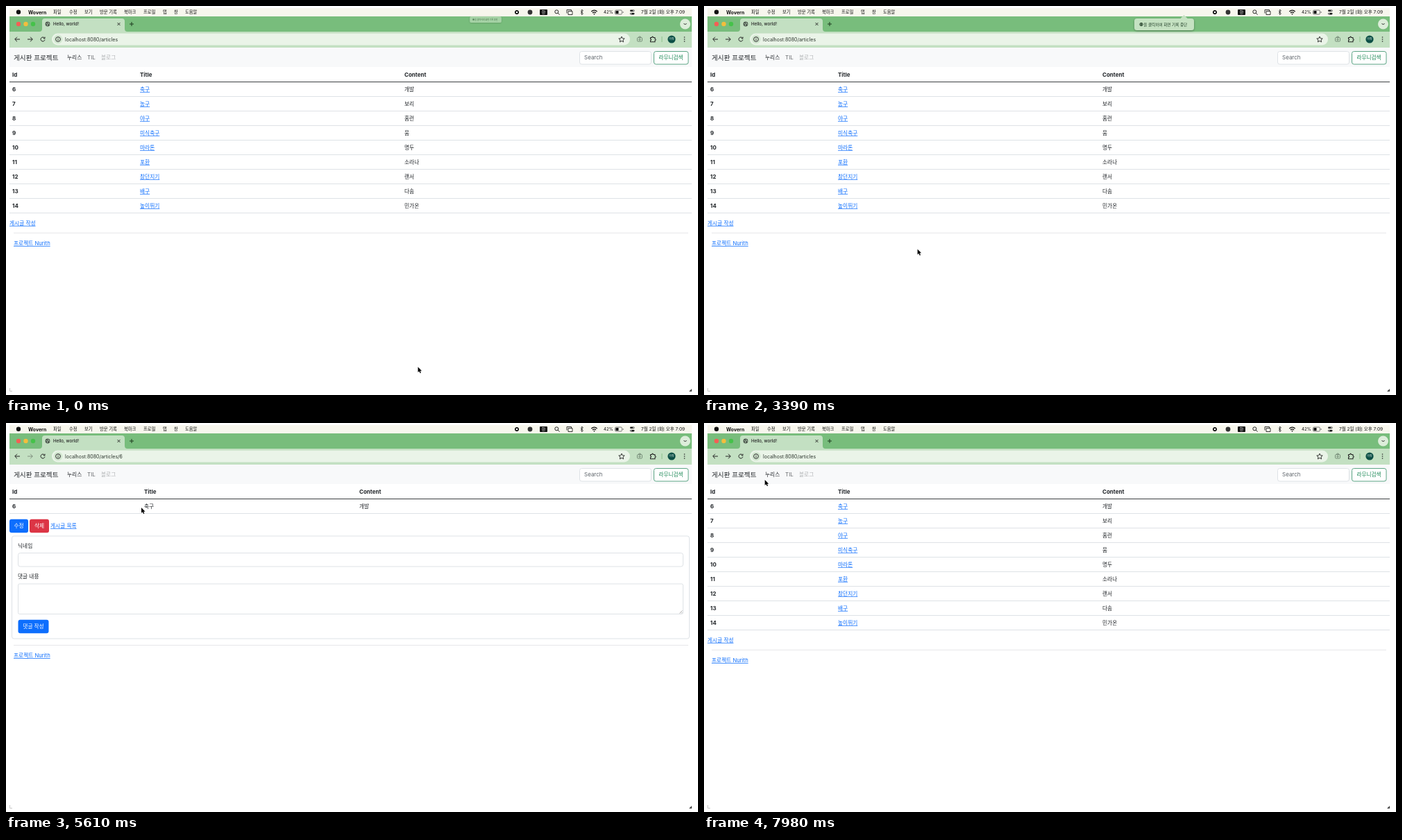
These frames come from a looping animation (997 px wide and 561 px high, 8000 ms). An HTML page:

```html
<!DOCTYPE html>
<html lang="ko">
<head>
<meta charset="utf-8">
<title>게시판 프로젝트</title>
<style>
html, body { margin: 0; height: 100%; overflow: hidden; background: #fff; }
svg { display: block; width: 100%; height: 100%; }
text { font-family: Inter, "Noto Sans CJK KR", sans-serif; white-space: pre; }
</style>
</head>
<body>
<svg id="stage" viewBox="0 0 997 561"></svg>
<script>
const LOOP = 8000, INK = '#212529', LINK = '#0d6efd', LINE = '#dee2e6';

// y is the visual middle of the line of text
const text = (x, y, s, size = 7.7, fill = INK, extra = '') =>
  `<text x="${x}" y="${y + size * 0.37}" font-size="${size}" fill="${fill}" ${extra}>${s}</text>`;
const bold = (x, y, s, size = 8) => text(x, y, s, size, INK, 'font-weight="700"');
const link = (x, y, s) => text(x, y, s, 7.7, LINK, 'text-decoration="underline"');
const rect = (x, y, w, h, fill, rx = 0, stroke = 'none') =>
  `<rect x="${x}" y="${y}" width="${w}" height="${h}" rx="${rx}" fill="${fill}" stroke="${stroke}"/>`;
const circle = (x, y, r, fill, stroke = 'none') =>
  `<circle cx="${x}" cy="${y}" r="${r}" fill="${fill}" stroke="${stroke}"/>`;
const path = (d, stroke = '#222', width = 1, fill = 'none') =>
  `<path d="${d}" stroke="${stroke}" stroke-width="${width}" fill="${fill}" stroke-linejoin="round"/>`;
const rule = (y, color = LINE, x1 = 5, x2 = 988) => path(`M${x1} ${y}H${x2}`, color);
const group = (id, body) => `<g id="${id}">${body}</g>`;

function menuBar() {
  const items = [[68, '파일'], [91, '수정'], [113, '보기'], [135, '방문 기록'], [170, '북마크'],
    [198, '프로필'], [226, '탭'], [242, '창'], [258, '도움말']];
  return rect(5, 3, 983, 12, '#f7f6ed') + circle(18, 8.8, 3.2, '#111') +
    text(32, 9, 'Wovern', 6.9, '#111', 'font-weight="700"') +
    items.map(([x, s]) => text(x, 9, s, 6.3, '#111', 'font-weight="500"')).join('') +
    circle(736, 9, 2.6, '#111', '#111') + circle(736, 9, 1.3, '#fff') +
    circle(755, 9, 3.4, '#333') +
    rect(769, 5, 11, 8, '#111', 1) + text(771.7, 9, '한', 6, '#fff') +
    circle(793.3, 8.3, 2.5, 'none', '#222') + path('M795.2 10.2L797.6 12.6') +
    path('M808 10.5V5.5H814.5V7M810 7.5H816V12.5H810Z', '#222', 0.9) +
    path('M827.7 7L831.5 10.8L829.6 12.8V5L831.5 7L827.7 10.8', '#222', 0.8) +
    path('M843.3 8Q847.5 4.2 851.7 8M845 10Q847.5 7.7 850 10', '#111', 1.3) + circle(847.5, 11.6, 0.9, '#111') +
    text(861, 9, '42%', 6.2, '#111') +
    rect(877.5, 6, 10, 6, 'none', 1.6, '#777') + rect(878.5, 7, 4, 4, '#111', 0.5) + path('M889.2 8V10', '#777') +
    rect(899, 5.5, 6.5, 2.6, '#222', 1.3) + rect(899, 9.8, 6.5, 2.6, '#222', 1.3) +
    circle(904, 6.8, 0.8, '#fff') + circle(900.5, 11.1, 0.8, '#fff') +
    text(915, 9, '7월 2일 (화) 오후 7:09', 6.5, '#111');
}

function browser() {
  const lights = ['#f45f55', '#f3be3c', '#45c24a'].map((c, i) => circle(18 + i * 10.5, 26, 3.2, c)).join('');
  return rect(5, 15, 983, 23, '#78bd7c') + rect(5, 37, 983, 23, '#c3e0c2') + lights +
    path('M48 37Q52 37 52 33V22Q52 18 56 18H167Q171 18 171 22V33Q171 37 175 37Z', 'none', 0, '#c3e0c2') +
    circle(60, 26, 3.4, '#4b554c') + path('M58 25L60 26.4L59.3 28.5M61 23.5L60.8 25L62.7 26.3', '#c3e0c2', 0.9) +
    text(68, 26, 'Hello, world!', 6.2, '#222', 'font-weight="500"') +
    path('M160.5 24L164.5 28M164.5 24L160.5 28', '#222', 0.9) +
    path('M178 26H184M181 23V29', '#1c3a1f') +
    circle(978.5, 26, 7.5, '#dcedda') + path('M976.5 25L978.5 27L980.5 25') +
    path('M20 48H13M16 44.7L12.7 48L16 51.3') +
    '<g id="forward">' + path('M31 48H38M35 44.7L38.3 48L35 51.3') + '</g>' +
    path('M55.4 46.1A3 3 0 1 0 56 48.6M56 44.6V46.8H53.8') +
    rect(66, 39.5, 833, 17, '#eaf4e8', 8.5) +
    circle(75, 48, 6.5, '#d3e8d1') + circle(75, 48, 3.4, 'none', '#333') + path('M75 47.5V50M75 45.8V46.7', '#333', 0.9) +
    '<text id="url" x="85" y="50.5" font-size="7" fill="#2a332b"></text>' +
    path('M887 44L888.2 46.7L891.2 47L889 49L889.6 51.9L887 50.4L884.4 51.9L885 49L882.8 47L885.8 46.7Z', '#222', 0.9) +
    rect(909.5, 45.5, 7, 5.5, 'none', 1.2, '#758b77') + path('M911.5 45L912.2 44H914L914.6 45', '#758b77') + circle(913, 48.2, 1.2, 'none', '#758b77') +
    path('M928.5 45.5H930.5Q931.5 42.8 932.7 45.5H935V47.5Q937.4 48.6 935 49.8V51.8H928.5V49.8Q930.6 48.6 928.5 47.5Z', '#222', 1.1) +
    path('M945 44V52', '#8cc08c') + circle(959, 48, 5.6, '#0c4f46') + text(955.3, 48, '하람', 4, '#d7e8e2') +
    [45, 48, 51].map(y => circle(977.5, y, 0.8, '#222')).join('');
}

function navbar() {
  return rect(5, 60, 983, 28, '#f8f9fa') + text(11, 74, '게시판 프로젝트', 9.6) +
    text(88, 74.3, '누리스', 7.7) + text(117, 74.3, 'TIL', 8, '#6b6e71') + text(137, 74.3, '블로그', 7.7, '#b0b2b4') +
    rect(826.5, 65.5, 103, 18.5, '#fff', 3, LINE) + text(833, 74.5, 'Search', 8, '#5f656b') +
    rect(933.5, 65.5, 49.5, 18.5, '#fff', 3, '#5da585') + text(940.5, 74.5, '라무니검색', 7.6, '#198754');
}

const articles = [['축구', '개발'], ['농구', '보리'], ['야구', '홈런'], ['미식축구', '움'], ['마라톤', '명두'],
  ['포환', '소라나'], ['창던지기', '랜서'], ['배구', '다솜'], ['높이뛰기', '민가온']];

const header = (x1, x2) => bold(9, 99, 'Id') + bold(x1, 99, 'Title') + bold(x2, 99, 'Content') + rule(109.5, '#3c4043');
const footer = y => rule(y, '#e6e7e9', 11, 983) + link(11, y + 14.8, '프로젝트 Nurith');

function listPage() {
  const rows = articles.map(([title, content], i) => {
    const y = 120 + i * 21;
    return bold(9, y, i + 6) + link(193, y, title) + text(574, y, content) + rule(y + 10.5);
  });
  return header(193, 574) + rows.join('') + link(5, 313, '게시글 작성') + footer(327.3);
}

function articlePage() {
  const button = (x, y, w, s, fill) => rect(x, y, w, 19.5, fill, 3) +
    text(x + w / 2, y + 9.8, s, 7.7, '#fff', 'text-anchor="middle" font-weight="500"');
  return header(199, 509) +
    ['id', 'title', 'content'].map((k, i) =>
      `<text id="${k}" x="${[9, 199, 509][i]}" y="122.9" font-size="${i ? 7.7 : 8}" font-weight="${i ? 400 : 700}" fill="${INK}"></text>`).join('') +
    rule(130.5) + button(5, 138.8, 27, '수정', LINK) + button(34, 138.8, 28, '삭제', '#dc3545') + link(64, 148, '게시글 목록') +
    rect(8.5, 163, 976, 148, '#fff', 3, LINE) + text(17, 177, '닉네임') +
    rect(17.5, 187.5, 958, 19.5, '#fff', 3, LINE) + text(17, 221.3, '댓글 내용') +
    rect(17.5, 232, 958, 43.5, '#fff', 2, LINE) + path('M970.5 274.5L974.5 270.5M973 274.5L974.5 273', '#888', 0.7) +
    button(17.5, 283.7, 44, '댓글 작성', LINK) + footer(320.5);
}

const popup = '<g id="popup">' +
  '<g filter="url(#shadow)">' + rect(-43, -8.5, 86, 17, '#c5e2c2', 4) + '</g>' +
  '<path id="beak" d="M23 -8L28.5 -13.5L34 -8Z" fill="#c5e2c2"/>' +
  circle(-33, 0, 2.2, 'none', '#24402a') + circle(-33, 0, 1.3, '#24402a') +
  text(-29.8, 0, '을 클릭하여 화면 기록 중단', 5.65, '#24402a', 'font-weight="500"') + '</g>';

const status = group('status', rect(5, 545.5, 78, 10.5, '#dcecdb', 1) +
  '<text id="target" x="8" y="553" font-size="5.9" fill="#39433a"></text>');

const pointers =
  group('arrow', path('M0 0V7.8L1.8 6.2L3.1 9.1L4.4 8.5L3.1 5.7H5.5Z', '#fff', 1.1, '#000') +
    path('M0 0V7.8L1.8 6.2L3.1 9.1L4.4 8.5L3.1 5.7H5.5Z', 'none', 0, '#000')) +
  group('hand', path('M-1 5V0Q0 -1.5 1 0V3Q2 2 2.8 3.2Q4 2.6 4.5 3.7Q5.5 3.4 5.6 4.5V6L4.5 8.5H0L-2.8 5Q-2.8 3.6 -1 5Z', '#111', 0.8, '#fff'));

const stage = document.getElementById('stage');
stage.innerHTML = '<filter id="shadow" x="-20%" y="-50%" width="140%" height="220%">' +
  '<feDropShadow dx="0" dy="1" stdDeviation="1.6" flood-opacity=".35"/></filter>' +
  menuBar() + browser() + navbar() + group('list', listPage()) + group('article', articlePage()) +
  path('M5.5 551V555.5H9', '#bbb', 0.8) + path('M988 552V556H984Z', 'none', 0, '#444') +
  status + popup + pointers;

const el = id => document.getElementById(id);
const show = (id, on) => { el(id).style.display = on ? '' : 'none'; };
const write = (id, s) => { el(id).textContent = s; };
const between = (t, a, b) => t >= a && t < b;
const ramp = (t, a, b) => Math.min(1, Math.max(0, (t - a) / (b - a)));
const mix = (a, b, k) => a + (b - a) * k;

const route = [[0, 593.5, 520.5], [3120, 593.5, 520.5], [3390, 308, 351], [3600, 232, 279], [3930, 232, 279],
  [4300, 214, 131], [4830, 214, 131], [5190, 202, 116.5], [5400, 202, 116.5], [5500, 195, 122],
  [6180, 195, 122], [6360, 199, 136], [7890, 199, 136], [7980, 87.7, 82], [LOOP, 87.7, 82]];

function draw(t) {
  const first = t < 6000;
  const onArticle = between(t, 5310, 6150) || between(t, 6540, 7200);
  const onLink = between(t, 5190, 5310) || between(t, 6330, 6540);
  const id = first ? 6 : 7, [title, content] = articles[id - 6];
  const base = 'localhost:8080/articles';

  show('list', !onArticle);
  show('article', onArticle);
  el('forward').style.opacity = onArticle ? 0.4 : 1;
  write('url', onArticle ? `${base}/${id}` : base);
  write('id', id);
  write('title', title);
  write('content', content);
  write('target', `${base}/${id}`);
  show('status', between(t, 5250, 5600) || between(t, 6420, 6960));

  const grow = 1 - (1 - ramp(t, 480, 780)) ** 3;
  el('popup').setAttribute('transform',
    `translate(${mix(691, 663, grow)} ${mix(19.5, 26.5, grow)}) scale(${mix(0.53, 1, grow)})`);
  el('popup').style.opacity = mix(0.6, 1, grow) * (1 - ramp(t, 3930, 4080));
  el('beak').style.opacity = grow;

  const i = route.findIndex(p => p[0] > t);
  const [t0, x0, y0] = route[i - 1], [t1, x1, y1] = route[i];
  const k = ramp(t, t0, t1);
  for (const name of ['arrow', 'hand'])
    el(name).setAttribute('transform', `translate(${mix(x0, x1, k)} ${mix(y0, y1, k)})`);
  show('hand', onLink);
  show('arrow', !onLink);
}

function tick() {
  draw(performance.now() % LOOP);
  requestAnimationFrame(tick);
}
tick();
</script>
</body>
</html>
```
